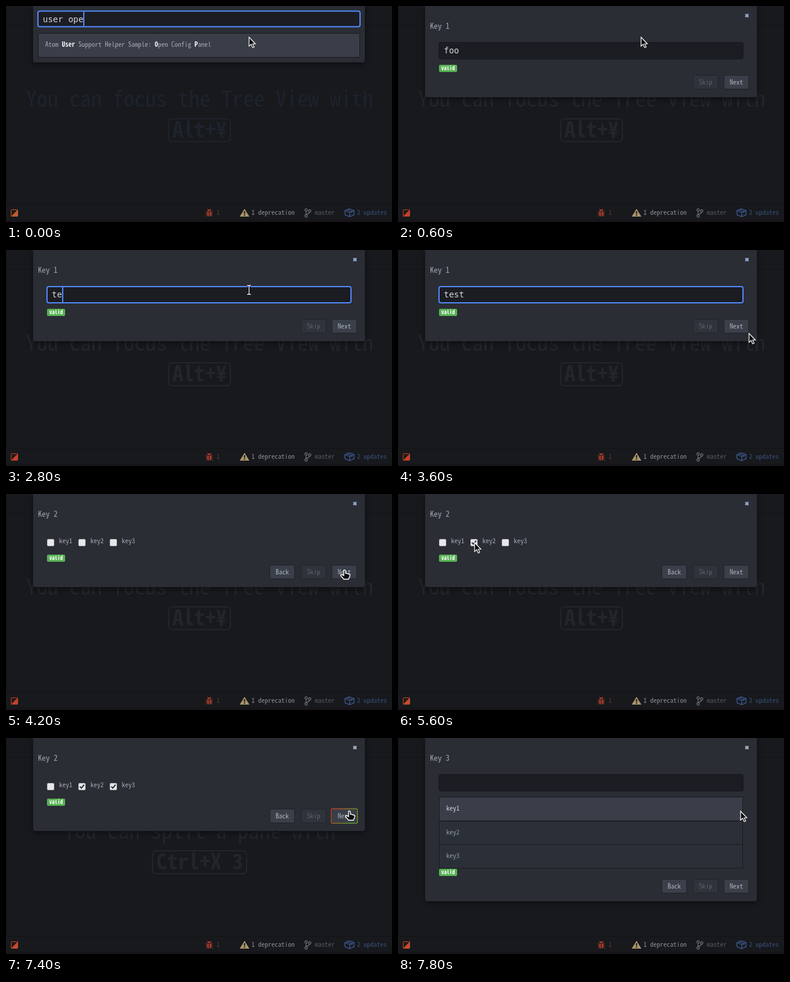
Write an HTML page with a canvas that moves like this. It is 640 px wide and 360 px high and loops after 8 s.

```html
<!DOCTYPE html>
<html lang="en">
<head>
<meta charset="utf-8">
<title>Config panel</title>
<style>
  html, body { margin: 0; width: 100%; height: 100%; overflow: hidden; background: #16181c; }
  canvas { display: block; width: 640px; height: 360px; }
</style>
</head>
<body>
<canvas id="stage" width="640" height="360"></canvas>
<script>
const ctx = document.getElementById('stage').getContext('2d');
const LOOP = 8000, STEP = 200;
const UI_FONT = '"Noto Sans Mono CJK JP", "Noto Sans Mono", monospace';
const EDITOR_FONT = '"DejaVu Sans Mono", monospace';
const BLUE = '#528bff', DARK = '#1b1d23', LINE = '#181a1f';

// The interface uses a half-em wide face; wider fallbacks get a smaller size.
ctx.font = '100px ' + UI_FONT;
const uiScale = 50 / ctx.measureText('0').width;

function text(str, x, y, color, size = 11, weight = 'normal', align = 'left') {
  ctx.font = `${weight} ${size * uiScale}px ${UI_FONT}`;
  ctx.textAlign = align;
  ctx.fillStyle = color;
  ctx.fillText(str, x, y);
}

function box(x, y, w, h, r, fill, stroke, width = 1) {
  ctx.beginPath();
  ctx.roundRect(x, y, w, h, r);
  if (fill) { ctx.fillStyle = fill; ctx.fill(); }
  if (stroke) { ctx.strokeStyle = stroke; ctx.lineWidth = width; ctx.stroke(); }
}

function shape(path, x, y, fill, stroke, width = 1) {
  const p = new Path2D(path);
  ctx.save();
  ctx.translate(x, y);
  if (fill) { ctx.fillStyle = fill; ctx.fill(p); }
  if (stroke) { ctx.strokeStyle = stroke; ctx.lineWidth = width; ctx.stroke(p); }
  ctx.restore();
}

function workspace(t) {
  ctx.fillStyle = '#17191d';
  ctx.fillRect(0, 0, 640, 360);
  ctx.fillStyle = '#121418';
  ctx.fillRect(0, 32, 640, 1);
  ctx.fillRect(0, 330, 640, 1);
  ctx.fillRect(0, 0, 1, 330);
  ctx.fillStyle = '#18151a';
  ctx.fillRect(0, 356, 640, 4);

  const [tip, keys] = t < 6600
    ? ['You can focus the Tree View with', 'Alt+¥']
    : ['You can split a pane with', 'Ctrl+X 3'];
  const ink = t < 400 ? '#1d232c' : '#22252a';
  text(tip, 321, 168, ink, 36, 'normal', 'center');
  text(keys, 321, 219, ink, 36, 'bold', 'center');
  const half = keys.length * 9 + 6;
  box(321 - half, 188, half * 2, 38, 6, null, ink, 2);
}

function statusBar(t) {
  const orange = t < 400 ? '#bd5c31' : t < 5000 ? '#c34029' : '#c34c2d';
  box(8.5, 339.5, 11, 11, 1, '#251916', orange);
  shape('M11 0V11H0Z', 8.5, 339.5, orange);

  const red = '#a63a2a';
  shape('M3 4Q3 1 6 1T9 4ZM2.5 5H5.5V13Q2.5 12 2.5 9ZM6.5 5H9.5V9Q9.5 12 6.5 13Z', 331, 338, red);
  shape('M4 2L3 0M8 2L9 0M3 6L0 4M3 8H0M3 10L0 13M9 6L12 4M9 8H12M9 10L12 13', 331, 338, null, red);
  text('1', 349, 348, '#68352f');

  shape('M7.5 0L15.5 13H-.5Z', 388, 338, '#aa956b');
  ctx.fillStyle = '#17191d';
  ctx.fillRect(394.5, 342, 2, 4.5);
  ctx.fillRect(394.5, 347.5, 2, 2);
  text('1 deprecation', 407, 348, '#898d94');

  shape('M2 4V10M2 9Q7 9 8 5M4 2A2 2 0 1 1 0 2A2 2 0 1 1 4 2M4 12A2 2 0 1 1 0 12A2 2 0 1 1 4 12M10 3.5A2 2 0 1 1 6 3.5A2 2 0 1 1 10 3.5',
    495.5, 338, null, '#676b72', 1.3);
  text('master', 512, 348, '#555960');

  shape('M0 3L7 0L15 3V10L8 13L0 10ZM0 3L8 6L15 3M8 6V13M3.5 1.5L11.5 4.5V7', 562, 338, null, '#405c95', 1.3);
  text('2 updates', 582, 348, '#3a4e75');
}

function modal(height) {
  ctx.save();
  ctx.shadowColor = 'rgba(0,0,0,.5)';
  ctx.shadowBlur = 8;
  ctx.shadowOffsetY = 3;
  box(45, 0, 550, height, [0, 0, 4, 4], '#2a2d34');
  ctx.restore();
}

function input(x, y, w, h, value, focused, caret) {
  if (focused) box(x, y, w, h, 3, DARK, BLUE, 2);
  else box(x - .5, y - .5, w + 1, h + 1, 3, DARK, LINE);
  ctx.font = '14px ' + EDITOR_FONT;
  ctx.textAlign = 'left';
  ctx.fillStyle = '#d3d6dc';
  ctx.fillText(value, x + 8, y + 18);
  if (caret) {
    ctx.fillStyle = BLUE;
    ctx.fillRect(x + 8 + Math.round(ctx.measureText(value).width), y + 1, 2, h - 2);
  }
}

function button(label, x, y, enabled = true) {
  box(x + .5, y + .5, 41, 23, 3, enabled ? '#3a3f49' : '#2f333b', enabled ? '#1d2025' : '#202328');
  text(label, x + 21, y + 16, enabled ? '#adb3be' : '#5b616b', 11, 'normal', 'center');
}

function palette(t) {
  modal(94);
  input(53, 8.5, 534, 26, t < 200 ? 'user ope' : 'user open', true, true);
  box(53.5, 45.5, 533, 40, 0, '#3a3e48', LINE);
  let x = 65;
  for (const [part, hit] of [['Atom ', 0], ['User', 1], [' Support Helper Sample: ', 0],
    ['O', 1], ['pen Config ', 0], ['P', 1], ['anel', 0]]) {
    text(part, x, 68, hit ? '#f0f1f4' : '#a5abb6', 11, hit ? 'bold' : 'normal');
    x += part.length * 5.5;
  }
}

function panel(t, title, height, badgeY, hasBack) {
  modal(height);
  text(title, 53, 38, '#a0a6b1', 13);
  shape('M1 1L6 6M6 1L1 6', 575, 12.5, null, t < 6600 ? '#9bb2dc' : '#b5bac4', 2.2);
  box(68, badgeY, 30, 12, 2, '#57b154');
  text('valid', 83, badgeY + 9, '#fff', 9, 'bold', 'center');
  const y = height - 37;
  if (hasBack) button('Back', 437, y);
  button('Skip', 489, y, false);
  button('Next', 540, y);
}

function typedValue(t) {
  if (t < 2600) return 'foo'.slice(0, t < 2000 ? 3 : 2 - (t - 2000) / STEP);
  return 'test'.slice(0, (t - 2400) / STEP);
}

function keyOne(t) {
  panel(t, 'Key 1', 152, 98, false);
  const focused = t >= 1600;
  input(68, 61, 504, 27, typedValue(t), focused, focused && t < 3600);
}

function keyTwo(t) {
  panel(t, 'Key 2', 155, 101, true);
  const checkedFrom = [Infinity, 5600, 6400];
  checkedFrom.forEach((time, i) => {
    const x = 68 + i * 52;
    box(x + .5, 75.5, 11, 11, 1.5, '#e6e7e8', '#b3b5b8');
    if (t >= time) shape('M2.5 6L5 8.5L9.5 3', x, 75, null, '#303338', 2);
    text('key' + (i + 1), x + 20, 82, '#a0a6b1');
  });
  if (t >= 7400) {
    const ring = ctx.createLinearGradient(540, 118, 570, 142);
    ring.addColorStop(0, '#c9402d');
    ring.addColorStop(1, '#6c9c2e');
    box(539.5, 118, 43, 24, 2, null, ring, 1.5);
  }
}

function keyThree(t) {
  panel(t, 'Key 3', 272, 218, true);
  input(68, 61, 504, 27, '', false, false);
  for (let i = 0; i < 3; i++) {
    const y = 98.5 + Math.round(i * 39.5);
    box(68.5, y, 503, 39.5, 0, i ? '#2b3038' : '#3a3e48', LINE);
    text('key' + (i + 1), 80, y + 22.5, i ? '#9299a4' : '#d0d3d9');
  }
}

// time, x, y of the pointer tip
const route = [
  [0, 403, 52], [1400, 403, 56], [1600, 403, 66], [3200, 403, 66], [3400, 510, 112],
  [3600, 582, 139], [3800, 566, 127], [4200, 560, 127], [4800, 342, 93], [5000, 232, 88],
  [5200, 146, 83], [5400, 127, 81], [5800, 127, 81], [6200, 176, 80], [6400, 177, 80],
  [6600, 290, 92], [7000, 545, 122], [7200, 568, 122], [8000, 568, 122]
];

function pointerAt(t) {
  const i = route.findIndex(p => p[0] > t);
  const [t0, x0, y0] = route[i - 1], [t1, x1, y1] = route[i];
  const k = t < 1400 ? 0 : (t - t0) / (t1 - t0);
  return [x0 + (x1 - x0) * k, y0 + (y1 - y0) * k];
}

function pointer(t) {
  const [x, y] = pointerAt(t);
  const overButton = t >= 3800 && t < 4400 || t >= 7000 && t < 7600;
  if (t >= 1600 && t < 3400) {
    const beam = 'M-3 -7H-1L0 -6L1 -7H3M0 -6V7M-3 8H-1L0 7L1 8H3';
    shape(beam, x, y, null, '#000', 3);
    shape(beam, x, y, null, '#fff', 1.3);
  } else if (overButton) {
    shape('M0 0Q2 -1 3 1V5L9 6.5Q11 7 10 10L8 15H0L-5 9Q-5 6 -2 8L0 9Z', x, y, '#0b0b0c', '#fff', 1.4);
  } else {
    shape('M0 0V15L3.5 11.8L6 17.5L8.5 16.3L6 11H10.5Z', x, y, '#0b0b0c', '#fff', 1.2);
  }
}

function draw(t) {
  workspace(t);
  statusBar(t);
  if (t < 400) palette(t);
  else if (t < 4000) keyOne(t);
  else if (t < 7600) keyTwo(t);
  else keyThree(t);
  pointer(t);
}

function frame() {
  const t = performance.now() % LOOP;
  draw(Math.floor(t / STEP) * STEP);
  requestAnimationFrame(frame);
}
frame();
</script>
</body>
</html>
```
